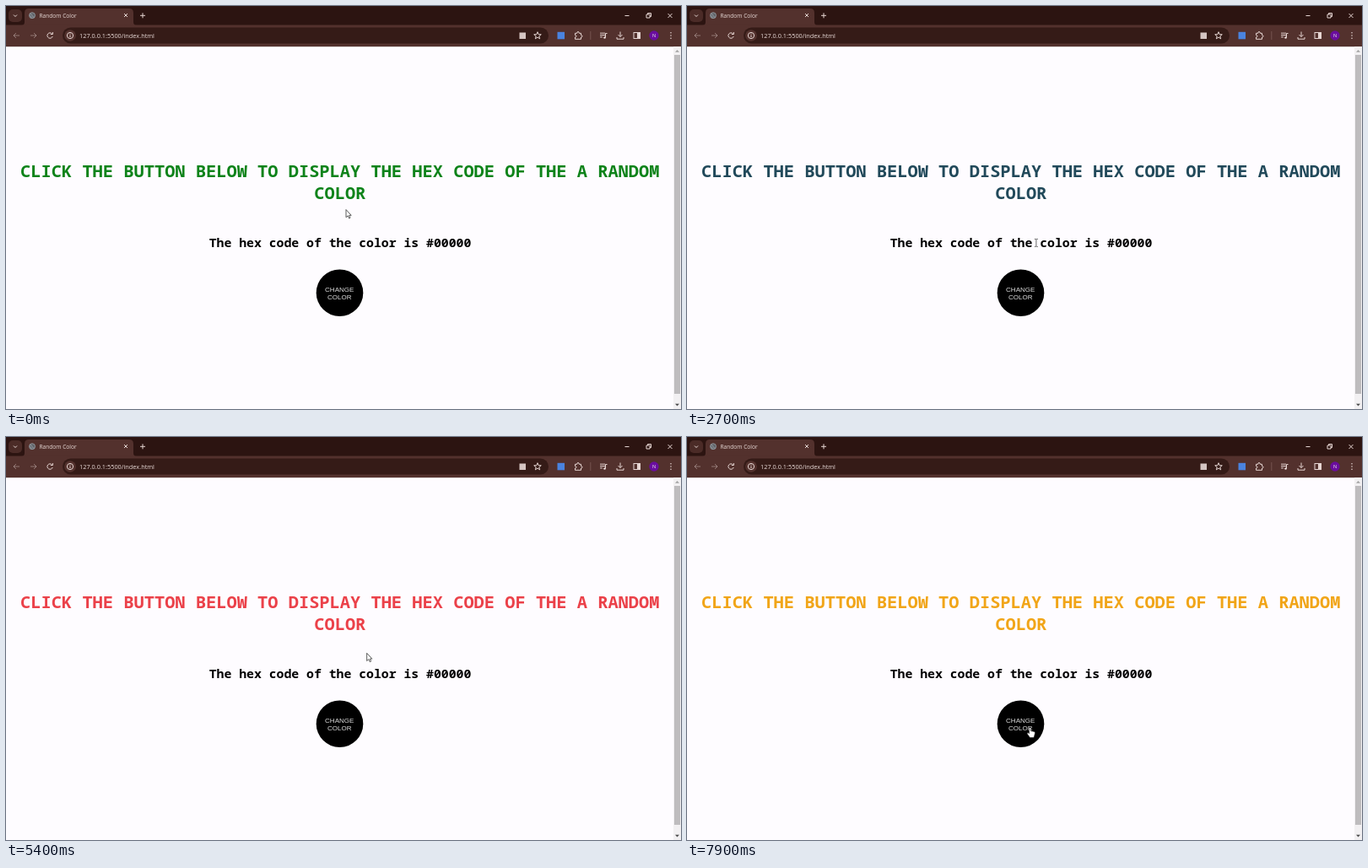
An HTML page that plays this animation: 800 by 478 pixels, repeating every 8000 ms.

```html
<!DOCTYPE html>
<html lang="en">
<head>
<meta charset="utf-8">
<title>Random Color</title>
<style>
  html, body { margin: 0; width: 100%; height: 100%; overflow: hidden; background: #fefcff; }
  svg { display: block; width: 100%; height: 100%; }
  .ui { font-family: "Open Sans", "Noto Sans", sans-serif; }
  .mono { font-family: "Noto Sans Mono", "DejaVu Sans Mono", monospace; font-weight: 700; text-anchor: middle; }
  .button { font: 8px "Liberation Sans", Arial, sans-serif; text-anchor: middle; fill: #dcdcdc; }
  .icon { fill: none; stroke: #e6d6d3; stroke-width: 1; }
</style>
</head>
<body>
<svg viewBox="0 0 800 478" preserveAspectRatio="none">
  <rect width="800" height="478" fill="#fefcff"/>

  <!-- tab strip -->
  <rect width="800" height="24" fill="#2c1411"/>
  <rect x="3" y="4" width="16" height="15" rx="5" fill="#4b2b27"/>
  <path class="icon" d="M9 10.5l2 2 2-2"/>
  <path d="M18 23q4 0 4-4V8q0-5 5-5H146q5 0 5 5V19q0 4 4 4z" fill="#53312d"/>
  <g fill="none" stroke="#9aa0a6" stroke-width=".8">
    <circle cx="31" cy="11.2" r="3.5" fill="#5f6368"/>
    <path d="M28.2 9.5q3 0 3 2t2.8 1.8M30 14.5v-2l-2-1"/>
  </g>
  <text class="ui" x="39.5" y="13.6" font-size="6.6" fill="#eadcd9">Random Color</text>
  <path class="icon" d="M140 9l4 4m0-4l-4 4M159 11.3h6m-3-3v6"/>
  <path class="icon" d="M733.5 11.5h5M784.5 9l5 5m0-5l-5 5"/>
  <path class="icon" d="M759 10h4v4h-4zM760.5 10V8.5h4v4H763"/>

  <!-- toolbar -->
  <rect y="22.5" width="800" height="25.7" fill="#53312d"/>
  <rect x="67" y="25.5" width="576" height="19" rx="9.5" fill="#351b17"/>
  <path class="icon" d="M16 35H9m3-3l-3 3 3 3M29 35h7m-3-3l3 3-3 3" stroke-opacity=".42"/>
  <path class="icon" d="M54.6 33a3.2 3.2 0 1 0 .6 3M55.4 31v2.5h-2.5"/>
  <circle cx="76" cy="35" r="6.8" fill="#53312d"/>
  <circle class="icon" cx="76" cy="35" r="3.6"/>
  <path class="icon" d="M76 34.5v2.6M76 32.7v.9"/>
  <text class="ui" x="87" y="37.7" font-size="7.35" fill="#eadcd9">127.0.0.1:5500/index.html</text>
  <rect x="608.5" y="31.5" width="7.5" height="7.5" fill="#d5c5c2"/>
  <path class="icon" id="star"/>
  <rect x="653.5" y="30.8" width="8.5" height="8.5" fill="#4a83df"/>
  <path class="icon" d="M674.5 32.3h2.2q0-1.8 1.3-1.8t1.3 1.8h2.2v2.3q1.5 0 1.5 1.2t-1.5 1.2v2.3h-7v-2.3q1.5 0 1.5-1.2t-1.5-1.2z"/>
  <path d="M692.8 30v10" stroke="#775551"/>
  <path class="icon" d="M704 32.2h6M704 34.5h6M704 36.8h3M710.5 37.5v-5h2"/>
  <circle cx="709.5" cy="37.5" r="1.3" fill="#e6d6d3"/>
  <path class="icon" d="M728 30.5v6m-2.5-2.5l2.5 2.5 2.5-2.5M724 37v2.2h8V37"/>
  <rect class="icon" x="744" y="31.5" width="7.5" height="7"/>
  <rect x="748" y="31.5" width="3.5" height="7" fill="#e6d6d3"/>
  <circle cx="768" cy="35" r="5.7" fill="#6a0d9e"/>
  <text class="ui" x="768" y="37" font-size="5.6" fill="#eee" text-anchor="middle">N</text>
  <path d="M788 31.8v.01M788 35v.01M788 38.2v.01" stroke="#e6d6d3" stroke-width="1.6" stroke-linecap="round"/>

  <!-- scrollbar -->
  <rect x="791" y="48.2" width="9" height="430" fill="#f2f0f2"/>
  <rect x="792" y="58" width="7" height="402" fill="#bebcbe"/>
  <path d="M793 54.7h5l-2.5-2.8z" fill="#a3a3a3"/>
  <path d="M793 471.8h5l-2.5 2.8z" fill="#505050"/>

  <!-- page -->
  <g id="heading" class="mono" font-size="20.38">
    <text x="395.8" y="202.7">CLICK THE BUTTON BELOW TO DISPLAY THE HEX CODE OF THE A RANDOM</text>
    <text x="395.8" y="228.9">COLOR</text>
  </g>
  <text class="mono" x="396" y="286" font-size="14.8">The hex code of the color is #00000</text>
  <circle cx="395.5" cy="340.2" r="27.8"/>
  <text class="button" x="395.2" y="338.6">CHANGE</text>
  <text class="button" x="395.2" y="348">COLOR</text>

  <g id="cursor">
    <path id="arrow" d="M0 0V9.2L2.1 7.3 3.6 10.4 5 9.7 3.6 6.8H6.2z" fill="#fff" stroke="#333" stroke-width=".8"/>
    <path id="beam" d="M-2-4.5H-.6L0-4 .6-4.5H2M0-4V4M-2 4.5H-.6L0 4 .6 4.5H2" fill="none" stroke="#444" stroke-width=".8"/>
    <path id="hand" d="M-1 .8Q0-.6 1 .8V4l4 1q1 .3 1 1.5L5.3 9.5 4.5 12H0L-3.3 7.6Q-3.5 6-2.2 6.3L-1 7.3z" fill="#fff" stroke="#222" stroke-width=".6"/>
  </g>
</svg>
<script>
const LOOP = 8000, STEP = 100;
const byId = id => document.getElementById(id);

// time, then value
const colors = [
  [0, [14, 131, 26]], [600, [6, 0, 238]], [1800, [46, 0, 160]], [3600, [20, 146, 20]],
  [4800, [240, 101, 128]], [6100, [230, 22, 8]], [7900, [241, 165, 24]]
];
const pointer = [
  [0, [403, 241.5]], [600, [399.3, 241.5]], [1800, [148.8, 348.8]], [3600, [679, 213]],
  [4800, [396.3, 236]], [6100, [467.2, 282]], [7900, [406.5, 344.5]]
];
const textBoxes = [[17, 184, 775, 209], [365, 209, 426, 239], [240, 271, 552, 291]];

const linear = p => p;
const smooth = p => p * p * (3 - 2 * p);

function sample(track, t, ease) {
  const next = track.findIndex(([time]) => time >= t);
  if (next <= 0) return track[0][1];
  const [t0, from] = track[next - 1], [t1, to] = track[next];
  const p = ease((t - t0) / (t1 - t0));
  return from.map((v, i) => v + (to[i] - v) * p);
}

function cursorKind(x, y) {
  if (Math.hypot(x - 395.5, y - 340.2) < 27.8) return "hand";
  const onText = textBoxes.some(([l, t, r, b]) => x > l && x < r && y > t && y < b);
  return onText ? "beam" : "arrow";
}

function starPath() {
  const points = Array.from({ length: 10 }, (_, i) => {
    const r = i % 2 ? 1.9 : 4.5, a = (i / 5 - 0.5) * Math.PI;
    return `${630 + r * Math.cos(a)} ${35.2 + r * Math.sin(a)}`;
  });
  return `M${points.join("L")}z`;
}

function render(t) {
  byId("heading").setAttribute("fill", `rgb(${sample(colors, t, linear).map(Math.round)})`);
  const [x, y] = sample(pointer, t, smooth);
  const kind = cursorKind(x, y);
  byId("cursor").setAttribute("transform", `translate(${x} ${y})`);
  for (const id of ["arrow", "beam", "hand"])
    byId(id).setAttribute("visibility", id === kind ? "visible" : "hidden");
}

byId("star").setAttribute("d", starPath());
const start = performance.now();
function tick() {
  const t = (performance.now() - start) % LOOP;
  render(Math.floor(t / STEP) * STEP);
  requestAnimationFrame(tick);
}
tick();
</script>
</body>
</html>
```
